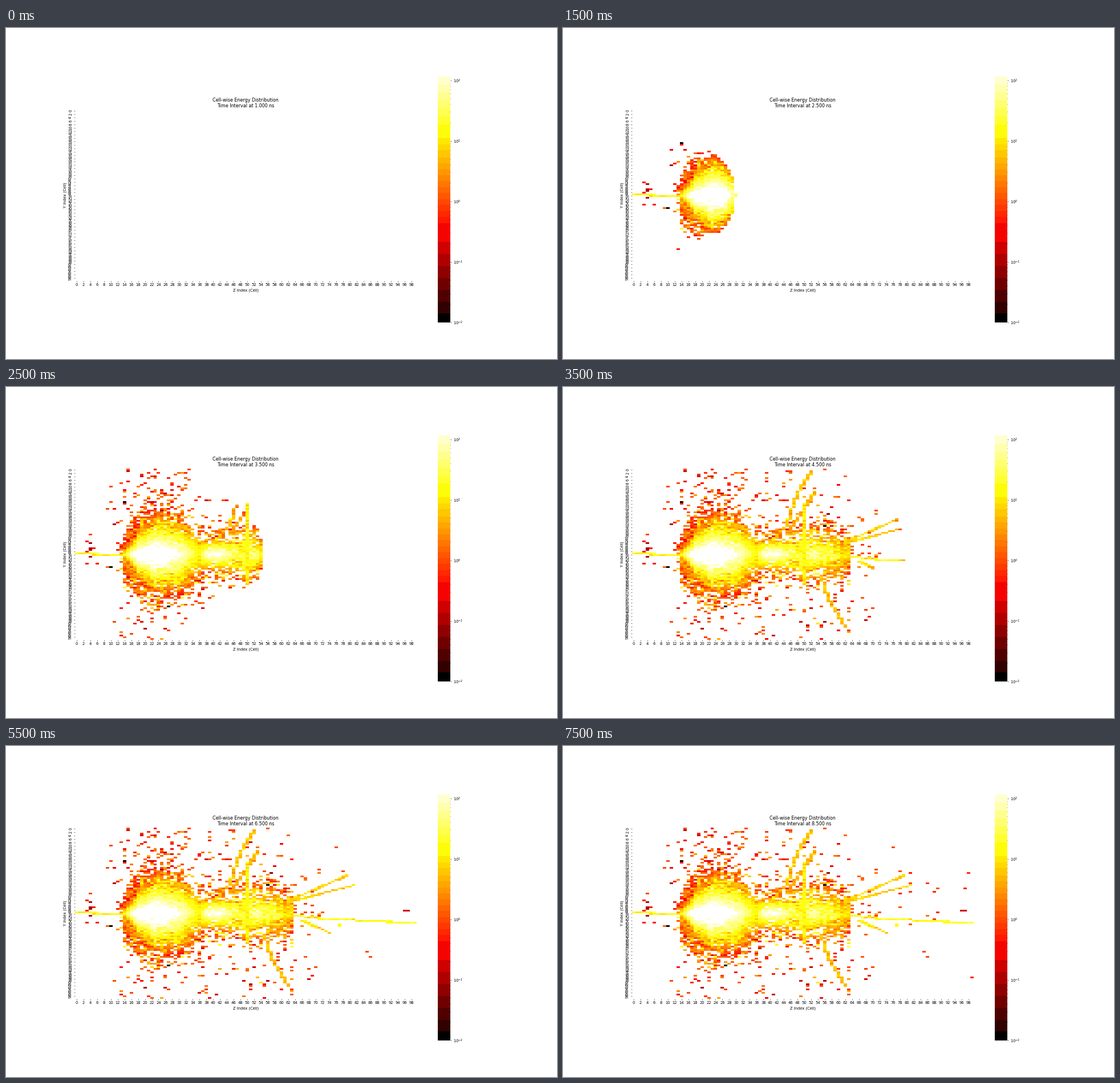
A matplotlib script that plays this animation: 966x580 px, repeating every 8 s.

```python
import numpy as np
import matplotlib.pyplot as plt
from matplotlib.animation import FuncAnimation
from matplotlib.colors import ListedColormap, LogNorm

W, H, DPI = 966, 580, 48.3
N, FRAMES, STEP_MS = 100, 16, 500
AXIS, SPEED, T0 = 49.5, 24.6, 1.28  # beam row, cells per ns, entry time
rng = np.random.default_rng(11)


def banded_hot():
    """The hot colormap, averaged within 3-4-3 bit colour bins."""
    base = plt.get_cmap("hot")(np.linspace(0, 1, 256))[:, :3]
    keys = np.floor(base * [7.999, 15.999, 7.999])
    bands = np.array([base[(keys == k).all(axis=1)].mean(axis=0) for k in keys])
    bands[(keys == keys[0]).all(axis=1)] = 0
    bands[(keys == keys[-1]).all(axis=1)] = 1
    return ListedColormap(bands)


def arrival(z, row):
    """Time at which a particle from the nearest vertex reaches a cell."""
    vertex = np.where(z < 36, np.minimum(z, 15), 37)
    path = np.hypot(z - vertex, (row - AXIS) / 2)  # rows are half as deep
    return T0 + (vertex + path) / SPEED


def shower():
    row, z = np.mgrid[:N, :N]
    dy = np.abs(row - AXIS)

    knots = [14, 16, 18, 23, 30, 36, 38, 41, 48, 53, 63]
    peak = [1.1, 2.2, 2.5, 2.75, 2.2, 1.3, 2.1, 2.3, 1.45, 1.8, 1]
    slope = [.25, .25, .15, .108, .085, .08, .2, .2, .07, .09, .08]
    core = np.interp(z, knots, peak, -3, -3) - dy * np.interp(z, knots, slope)
    halo = 0.25 - 0.015 * np.clip(dy - 18, 0, 30)
    spread = np.minimum(0.06 + 0.013 * dy, 0.35) + 0.12 * (z > 44)
    spread = np.where(core > halo, spread, 0.42)
    level = np.maximum(core, halo) + spread * rng.standard_normal((N, N))

    reach = np.interp(z, [12, 15, 23, 30, 37, 55, 63, 64],
                      [-5, 20, 28, 26, 14, 16, 15, -6])
    filled = 1 / (1 + np.exp((dy - reach) / 3))
    filled *= np.where((z > 33) & (dy > 8), 0.75, 1)
    tail = np.where(row < AXIS, 0.22, 0.10) * np.exp(-((z - 26) / 9) ** 2)
    tail += 0.07 * ((z > 35) & (z < 64)) + 0.015 * ((z > 8) & (z < 16))
    filled = np.where((z > 10) & (z < 73), np.maximum(filled, tail), 0)
    seen = rng.random((N, N)) < filled

    delay = np.where(core > halo, 0, rng.exponential(0.1, (N, N)))
    time = arrival(z, row) + delay
    late = (z > 34) & (core < halo) & (rng.random((N, N)) < 0.05)
    time = np.where(late, rng.uniform(4.6, 8.4, (N, N)), time)
    return np.where(seen, level, np.nan), time


level, time = shower()


def put(z, row, value, delay=0.0, since=0.0):
    level[row, z] = value
    time[row, z] = max(arrival(z, row) + delay, since)


def track(points, value, delay=0.0):
    """Rasterise a particle path through (z, row) points."""
    for (z0, r0), (z1, r1) in zip(points, points[1:]):
        n = 2 * max(abs(z1 - z0), abs(r1 - r0)) + 1
        for z, r in zip(np.linspace(z0, z1, n), np.linspace(r0, r1, n)):
            put(int(z + 0.5), int(r + 0.5), value + rng.normal(0, 0.14), delay)


def scatter(count, z_range, rows, since):
    """Stray hits over a block of cells."""
    for z, row in zip(rng.integers(*z_range, count), rng.integers(*rows, count)):
        put(z, row, rng.normal(-0.1, 0.2), since=since)


scatter(10, (64, 72), (23, 50), 4.2)
scatter(7, (64, 71), (62, 90), 4.2)
scatter(14, (77, 90), (24, 58), 8)

# level, earliest time, (z, row) cells
HITS = [
    (-0.3, 0, [(3, 42), (5, 46), (3, 48), (3, 55), (6, 55), (14, 20), (13, 81), (18, 88)]),
    (-0.9, 0, [(4, 43), (4, 46), (4, 47), (4, 51), (11, 32)]),
    (-1.95, 0, [(14, 19), (10, 57), (27, 80), (56, 33)]),
    (0.2, 0, [(9, 57), (18, 86), (24, 17)]),
    (0, 2.7, [(4, 38), (9, 23), (10, 19), (10, 10)]),
    (0, 5, [(76, 11), (78, 25), (85, 72), (86, 75)]),
    (-0.8, 5.5, [(96, 48), (97, 48)]),
    (-0.2, 8, [(98, 26), (97, 35), (99, 87)]),
]
for value, since, cells in HITS:
    for z, row in cells:
        put(z, row, value, since=since)

track([(0, 49), (6, 49)], 1.2)
track([(5, 50), (14, 50)], 1.1)
track([(41, 40), (45, 32), (47, 19), (49, 10), (52, 1)], 0.75)
track([(45, 37), (49, 26), (53, 13)], 0.6)
track([(50, 20), (50, 67)], 1.1, -0.2)
track([(55, 62), (57, 75), (62, 92)], 0.75)
track([(62, 42), (76, 30), (79, 27)], 0.8)
track([(62, 43), (81, 33)], 0.85)
track([(62, 51), (71, 52)], 1.1)
for z, row in (71, 53), (82, 54), (91, 55):
    track([(z, row), (min(z + 10, N - 1), row)], 1.2)
track([(66, 54), (74, 61)], 1.0, 0.35)
track([(77, 56), (77, 57)], 1.1, 0.4)


def energy(t):
    age = t - time
    ramp = -0.6 * np.clip(1 - age / 0.12, 0, 1) * (level > 0.3)
    shown = np.clip(level + ramp, -1.97, 3)
    return np.ma.masked_invalid(np.where(age >= 0, 10 ** shown, np.nan))


fig = plt.figure(figsize=((W + 0.01) / DPI, (H + 0.01) / DPI), dpi=DPI, facecolor="white")
ax = fig.add_subplot()
mesh = ax.pcolormesh(energy(1.0), cmap=banded_hot(), norm=LogNorm(0.01, 162.5))
ax.set(xlim=(0, N), ylim=(N, 0), aspect=0.5,
       xlabel="Z Index (Cell)", ylabel="Y Index (Cell)")
ax.spines[:].set_visible(False)
ticks = np.arange(0, N, 2)
ax.set_xticks(ticks + 0.5, ticks)
ax.set_yticks(ticks + 0.5, ticks, rotation="vertical", va="center")
bar = fig.colorbar(mesh, ax=ax)
bar.outline.set_linewidth(0)
title = ax.set_title("")


def update(i):
    t = 1 + 0.5 * i
    mesh.set_array(energy(t))
    title.set_text(f"Cell-wise Energy Distribution\nTime Interval at {t:.3f} ns")
    return mesh, title


anim = FuncAnimation(fig, update, frames=FRAMES, interval=STEP_MS,
                     repeat=True, repeat_delay=0, blit=False)
plt.show()
```
